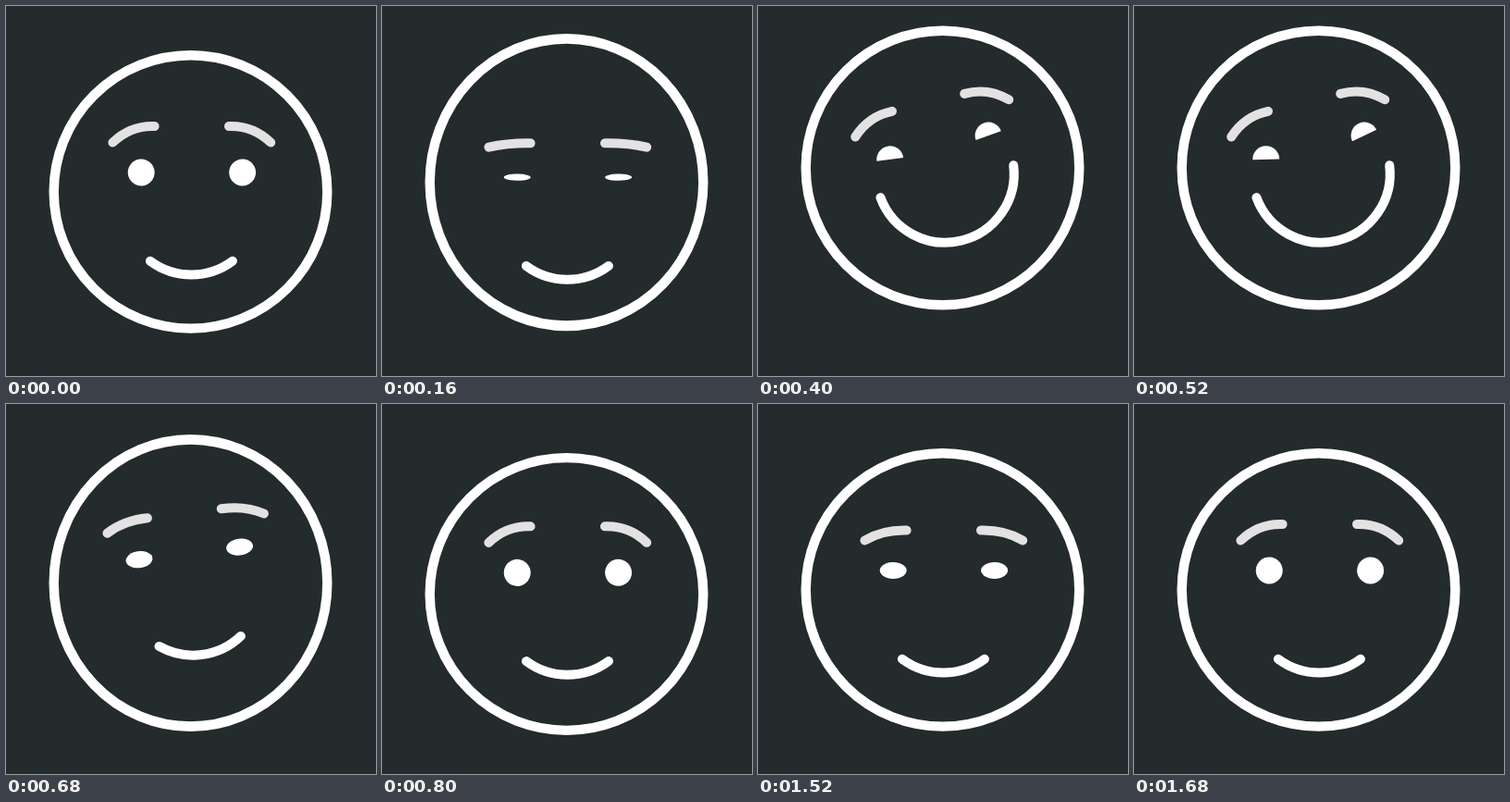
Recreate the animation shown at these times as an HTML page. Size 400 px wide and 400 px high, loop 2560 ms.

```html
<!DOCTYPE html>
<html lang="en">
<head>
<meta charset="utf-8">
<title>Smile</title>
<style>
  html, body { margin: 0; width: 100%; height: 100%; overflow: hidden; background: #232b2c; }
  svg { display: block; width: 100%; height: 100%; }
</style>
</head>
<body>
<svg viewBox="0 0 400 400" fill="none" stroke-width="10" stroke-linecap="round" stroke-linejoin="round">
  <circle id="head" r="147.8" stroke="#fff" stroke-width="10.4"/>
  <g id="face">
    <path id="browL" stroke="#e3e1e1"/>
    <path id="browR" stroke="#e3e1e1"/>
    <path id="eyeL" fill="#fff"/>
    <path id="eyeR" fill="#fff"/>
    <path id="mouth" stroke="#fff"/>
  </g>
</svg>
<script>
const LOOP = 2560, STEP = 40;
const HEAD = 153, EYE = 14.5, SMILE = 74.5;
const CALM = 36.7, WIDE = 83.3; // half the mouth's arc, in degrees

// Times below count steps of 40 ms.
function ease(t, from, to) {
  const u = Math.min(1, Math.max(0, (t - from) / (to - from)));
  return u * u * (3 - 2 * u);
}
// Goes from 0 to 1 between a and b, and back between c and d.
const hold = (t, a, b, c, d) => ease(t, a, b) - ease(t, c, d);
const bump = (t, a, peak, b) => hold(t, a, peak, peak, b);

function pose(t) {
  return {
    // The upper edge leads the jump, the lower edge follows.
    top: 48 - 26.5 * hold(t, 1.5, 5.5, 15, 19.4) + 6 * bump(t, 0, 2, 4) + 5 * bump(t, 18, 20, 24),
    bottom: 353.8 - 25.4 * hold(t, 3.2, 7.2, 14, 17) + 7 * (bump(t, 0, 2, 4) + bump(t, 16.8, 18.5, 22)),
    y: 201 - 27.5 * hold(t, 4, 8, 15, 20.3) + 5.2 * bump(t, 0, 4, 8) + 3.5 * bump(t, 18, 21, 25),
    turn: -13.6 * hold(t, 4, 8.5, 14, 20.2),
    open: 1 - .75 * (bump(t, 0, 4, 7) + bump(t, 14, 16, 18) + hold(t, 37, 39, 40, 42)),
    squint: hold(t, 4, 7.7, 14, 17),
    tilt: 18 * ease(t, 5, 13) - 6,
    grin: hold(t, 4, 7.4, 14, 17)
  };
}

function set(id, attrs) {
  const node = document.getElementById(id);
  for (const name in attrs) node.setAttribute(name, attrs[name]);
}

// Face parts are placed around the middle of the face.
function brow(id, side, open) {
  const x = d => .6 + side * d, y = h => -53.5 - h * open;
  set(id, { d: `M${x(85.4)} ${y(0)}Q${x(66)} ${y(18.5)} ${x(40.2)} ${y(17.5)}` });
}

function eye(id, side, { open, squint, tilt }) {
  const depth = (EYE - .1) * (1 - squint);
  const half = Math.sqrt(EYE * EYE - depth * depth);
  set(id, {
    d: `M${-half} ${depth}A${EYE} ${EYE} 0 1 1 ${half} ${depth}Z`,
    transform: `translate(${.7 + side * 54.7} -21) scale(1 ${open}) rotate(${-side * tilt})`
  });
}

function mouth(grin) {
  const a = (CALM + (WIDE - CALM) * grin) * Math.PI / 180;
  const x = SMILE * Math.sin(a), y = 15 - 7 * grin + SMILE * Math.cos(a);
  set("mouth", { d: `M${.2 - x} ${y}A${SMILE} ${SMILE} 0 0 0 ${.2 + x} ${y}` });
}

function draw(ms) {
  const p = pose(Math.floor(ms % LOOP / STEP));
  const middle = (p.top + p.bottom) / 2, stretch = (p.bottom - p.top) / (2 * HEAD);
  set("head", { transform: `translate(199.5 ${middle}) scale(1 ${stretch})` });
  set("face", { transform: `translate(200.2 ${p.y}) rotate(${p.turn})` });
  for (const [name, side] of [["L", -1], ["R", 1]]) {
    brow("brow" + name, side, p.open);
    eye("eye" + name, side, p);
  }
  mouth(p.grin);
}

const start = performance.now();
function tick(now) {
  draw(Math.max(0, now - start));
  requestAnimationFrame(tick);
}
draw(0);
requestAnimationFrame(tick);
</script>
</body>
</html>
```
